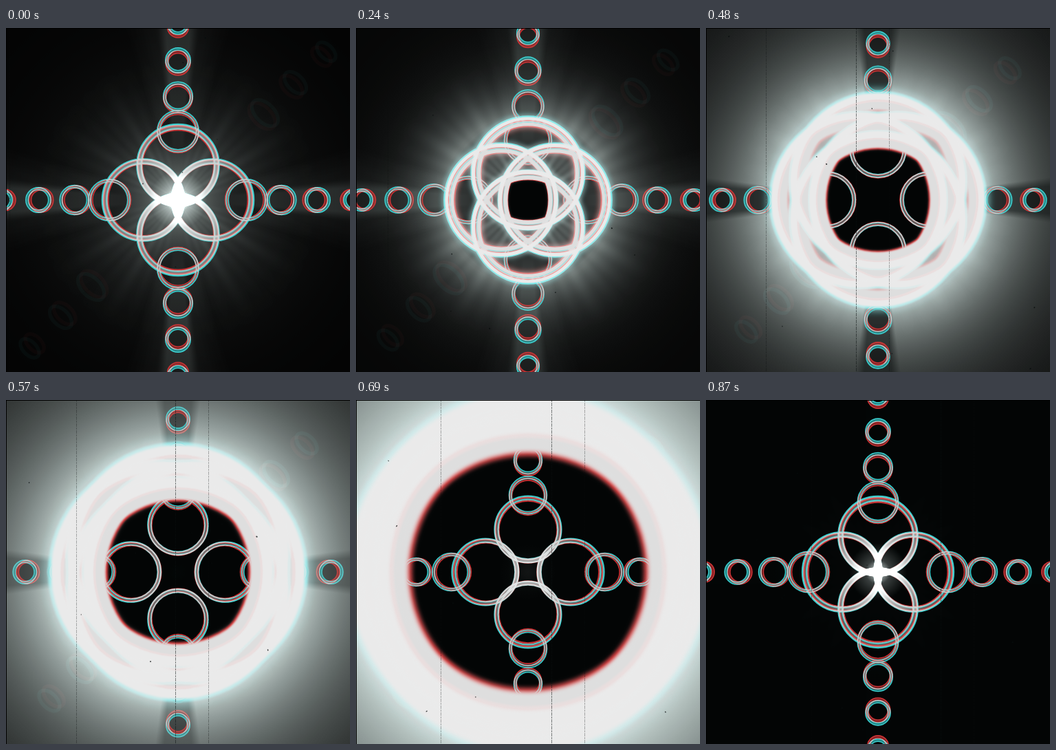
These frames come from a looping animation (500 px wide and 500 px high, 0.9 s). An HTML page with a canvas:

```html
<!DOCTYPE html>
<html lang="en">
<head>
<meta charset="utf-8">
<title>Ring bloom</title>
<style>
html, body { margin: 0; width: 100%; height: 100%; overflow: hidden; background: #000; }
canvas { display: block; width: 100vw; height: 100vh; }
</style>
</head>
<body>
<canvas id="stage" width="500" height="500"></canvas>
<script>
const SIZE = 500, MID = 250, FAR = 354, PAD = 50;
const LOOP = 900, STEP = 30, TAU = Math.PI * 2;
const ctx = document.getElementById('stage').getContext('2d');

// A ring group drifts inward and grows; one loop is one unit of age
const DISTANCE = [254, 201, 149, 99, 50, 8];
const CURVATURE = [.072, .0615, .0515, .0355, .0179, .0005];

const ramp = (x, a, b) => Math.min(1, Math.max(0, (x - a) / (b - a)));
const grey = v => `rgb(${v * .93},${v},${v * .985})`;
const cyan = v => `rgb(${v * .28},${v},${v})`;
const red = v => `rgb(${v},${v * .25},${v * .26})`;

function along(list, x) {
  const i = Math.min(list.length - 2, Math.max(0, Math.floor(x)));
  return list[i] + (list[i + 1] - list[i]) * (x - i);
}

function group(age) {
  const r = 1 / along(CURVATURE, age), late = Math.max(0, age - 4);
  return {
    d: along(DISTANCE, age), r,
    gap: Math.max(1.7, r * .055),
    half: Math.max(.8, r * (.025 + .07 * late))
  };
}

function layer(pad = 0) {
  const c = document.createElement('canvas');
  c.width = c.height = SIZE + pad * 2;
  const g = c.getContext('2d');
  g.translate(pad, pad);
  return g;
}

function radial(c, stops, reach) {
  const g = c.createRadialGradient(MID, MID, 0, MID, MID, reach);
  for (const [r, color] of stops) g.addColorStop(r / reach, color);
  return g;
}

// Draw with a blend mode, alpha and blur, then restore
function blend(c, mode, alpha, blur, paint) {
  c.save();
  c.globalCompositeOperation = mode;
  c.globalAlpha = alpha;
  if (blur) c.filter = `blur(${blur}px)`;
  paint();
  c.restore();
}

// Fans around the middle, shaped by angle and faded by radius
function fan(rgb, shape, fade) {
  const c = layer(), g = c.createConicGradient(0, MID, MID), n = 720;
  for (let i = 0; i <= n; i++) {
    const q = (i / n * TAU) % (TAU / 4);
    g.addColorStop(i / n, `rgba(${rgb},${shape(Math.min(q, TAU / 4 - q))})`);
  }
  c.fillStyle = g;
  c.fillRect(0, 0, SIZE, SIZE);
  c.globalCompositeOperation = 'destination-in';
  c.fillStyle = radial(c, fade.map(([r, a]) => [r, `rgba(0,0,0,${a})`]), FAR);
  c.fillRect(0, 0, SIZE, SIZE);
  return c.canvas;
}

const beams = fan('225,245,240',
  x => .12 * (1 - ramp(x, .07, .12)) + .05 * (1 - ramp(x, .12, .3)),
  [[0, 0], [70, 0], [135, 1], [FAR, .65]]);
const rays = fan('225,245,240',
  x => .14 * Math.max(0, .5 + .3 * Math.sin(16 * x - 1) + .25 * Math.sin(37 * x)) * ramp(x, .15, .4),
  [[0, 0], [25, .4], [60, 1], [110, .6], [210, 0], [FAR, 0]]);
const shadow = fan('8,12,12',
  x => 1 - ramp(x, .08, .13),
  [[0, 0], [100, .6], [160, 1], [FAR, .6]]);

function four(c, d, r, paint) {
  for (let i = 0; i < 4; i++) {
    const a = i * TAU / 4;
    c.beginPath();
    c.arc(MID + Math.cos(a) * d, MID + Math.sin(a) * d, Math.max(0, r), 0, TAU);
    paint.call(c);
  }
}

function shade(c, { d, r, gap }, alpha) {
  c.fillStyle = `rgba(0,0,0,${alpha})`;
  four(c, d, r + gap, c.fill);
}

// Glow, fans and darkened discs
function light(c, glow, p, ray, beam, dark) {
  const stops = [];
  for (let r = 0; r <= FAR; r += 6) stops.push([r, grey(glow(r))]);
  c.fillStyle = radial(c, stops, FAR);
  c.fillRect(0, 0, SIZE, SIZE);
  blend(c, 'source-over', dark, 0, () => c.drawImage(shadow, 0, 0));
  blend(c, 'lighter', ray, 0, () => c.drawImage(rays, 0, 0));
  blend(c, 'lighter', beam, 0, () => c.drawImage(beams, 0, 0));
  for (let k = 0; k < 4; k++) shade(c, group(k + p), .35);
}

// Colour-split strokes: cyan pushed outward, red pulled inward
function stroke(d, r, width, level, alpha, split, blur = 0) {
  if (alpha <= 0) return;
  blend(ctx, 'lighten', alpha, blur, () => {
    ctx.lineWidth = width;
    for (const [color, scale] of [[cyan, 1 + split], [red, 1 - split]]) {
      ctx.strokeStyle = color(level);
      four(ctx, d * scale, r * scale, ctx.stroke);
    }
  });
}

function pair({ d, r, gap, half }, level, band, split, blur) {
  stroke(d, r, gap * 2, level * .75, band, split, blur);
  stroke(d, r + gap, half * 2, level, 1, split, blur);
  stroke(d, r - gap, half * 2, level * .95, 1, split, blur);
}

// Lines burn white close to the middle
function hot({ d, r, gap }, alpha) {
  if (alpha <= 0) return;
  blend(ctx, 'lighten', alpha, 0, () => {
    ctx.strokeStyle = radial(ctx, [[0, 'rgba(240,245,244,1)'], [35, 'rgba(236,240,240,.9)'], [90, 'rgba(225,232,230,0)']], 90);
    ctx.lineWidth = gap * 2 + 1;
    four(ctx, d, r, ctx.stroke);
  });
}

// Keep only what lies inside all four discs
function keepInside(c, d, r) {
  blend(c, 'destination-in', 1, 0, () => four(c, d, r, c.fill));
}

function ghosts(p) {
  blend(ctx, 'lighter', 1, 0, () => {
    ctx.lineWidth = 5;
    for (let k = 0; k < 3; k++) {
      const { d, r } = group(k + p);
      for (const side of [-1, 1]) {
        for (const [color, scale] of [[cyan, 1.2], [red, 1.16]]) {
          const o = side * d * scale * Math.SQRT1_2;
          ctx.strokeStyle = color(7);
          ctx.beginPath();
          ctx.ellipse(MID + o, MID - o, r * .7, r * 1.2, -TAU / 8, 0, TAU);
          ctx.stroke();
        }
      }
    }
  });
}

function film(t) {
  const a = 218 + .315 * (t - 480), on = ramp(t, 300, 480);
  ctx.setLineDash([3, 1, 5, 1]);
  ctx.lineWidth = 1;
  for (const [x, alpha] of [[a, .5 * on], [a + 48, .3 * on], [46 + .17 * (t - 240), .3]]) {
    ctx.strokeStyle = `rgba(10,16,16,${alpha})`;
    ctx.beginPath();
    ctx.moveTo(Math.round(x) + .5, 0);
    ctx.lineTo(Math.round(x) + .5, SIZE);
    ctx.stroke();
  }
  ctx.setLineDash([]);
  let seed = t * 37 + 11;
  const rnd = () => (seed = (seed * 16807 + 7) % 2147483647) / 2147483647;
  for (let i = 0; i < 8; i++) rnd();
  ctx.fillStyle = 'rgba(8,12,12,.8)';
  for (let i = 0; i < 10; i++) {
    ctx.beginPath();
    ctx.ellipse(rnd() * SIZE, rnd() * SIZE, .5 + rnd() * .9, .5 + rnd() * .5, rnd() * 3, 0, TAU);
    ctx.fill();
  }
}

const hole = layer(PAD), inner = layer();

function draw(t) {
  const p = t / LOOP, burst = group(4 + p);
  const { d, r, gap, half } = burst;
  const edge = d + r + gap + half, inside = r - gap - half;
  const blur = .6 + 9 * p ** 4, split = .009 + .01 * p * p;
  const early = 1 - ramp(p, 0, .3), late = ramp(p, .5, 1);

  // Glow around the burst spreads and brightens
  const power = 215 * (1 - (1 - p) ** 2.2), reach = 30 / (1 - p) ** 1.33;
  const core = x => 150 * Math.exp(-x / 70);
  const outer = x => 3 + 10 * p + early * core(x) + power *
    (x < edge ? .6 + .4 * ramp(x, edge * .8, edge) : Math.exp((edge - x) / reach));
  light(ctx, outer, p, .5 + .5 * ramp(p, 0, .25) - ramp(p, .4, .8),
    1 - ramp(p, .3, .5), .6 * ramp(p, .2, .5) * (1 - ramp(p, .55, .75)));
  ghosts(p);

  // Soft white halo, then the dark opening cut out of it
  stroke(d, r, (gap + half) * 2.6, 215, .6 * ramp(p, 0, .25), split, blur * 2 + 2);
  hole.clearRect(-PAD, -PAD, SIZE + PAD * 2, SIZE + PAD * 2);
  hole.fillStyle = '#030505';
  hole.fillRect(-PAD, -PAD, SIZE + PAD * 2, SIZE + PAD * 2);
  keepInside(hole, d, inside + 2);
  blend(ctx, 'source-over', ramp(p, .03, .2), blur + 2, () => ctx.drawImage(hole.canvas, -PAD, -PAD));

  // Next light seen through the opening
  if (late > 0) {
    light(inner, x => late * core(x), p, late * .8, late, 0);
    keepInside(inner, d, inside);
    blend(ctx, 'lighter', 1, 0, () => ctx.drawImage(inner.canvas, 0, 0));
  }

  pair(burst, 205 + 29 * ramp(p, 0, .25), .7 * early + ramp(p, .45, .6), split, blur * .8);
  hot(burst, early);
  for (let k = -1; k < 4; k++) pair(group(k + p), 205, .8 - .1 * Math.max(0, k), .01, 0);
  hot(group(3 + p), late);

  const flare = Math.max(1 - p / .2, ramp(p, .75, 1));
  if (flare > 0) blend(ctx, 'lighter', flare * .9, 0, () => {
    ctx.fillStyle = radial(ctx, [[0, 'rgba(240,248,246,1)'], [8, 'rgba(235,245,243,.8)'], [18, 'rgba(220,235,232,.3)'], [42, 'rgba(200,220,215,0)']], 42);
    ctx.fillRect(MID - 42, MID - 42, 84, 84);
  });

  film(t);
  ctx.fillStyle = '#000';
  ctx.fillRect(0, 0, SIZE, 1);
  ctx.fillRect(0, 0, 1, SIZE);
}

const start = performance.now();
let last = -1;
function tick() {
  const now = Math.max(0, performance.now() - start) % LOOP;
  const t = Math.floor(now / STEP) * STEP;
  if (t !== last) draw(last = t);
  requestAnimationFrame(tick);
}
tick();
</script>
</body>
</html>
```
